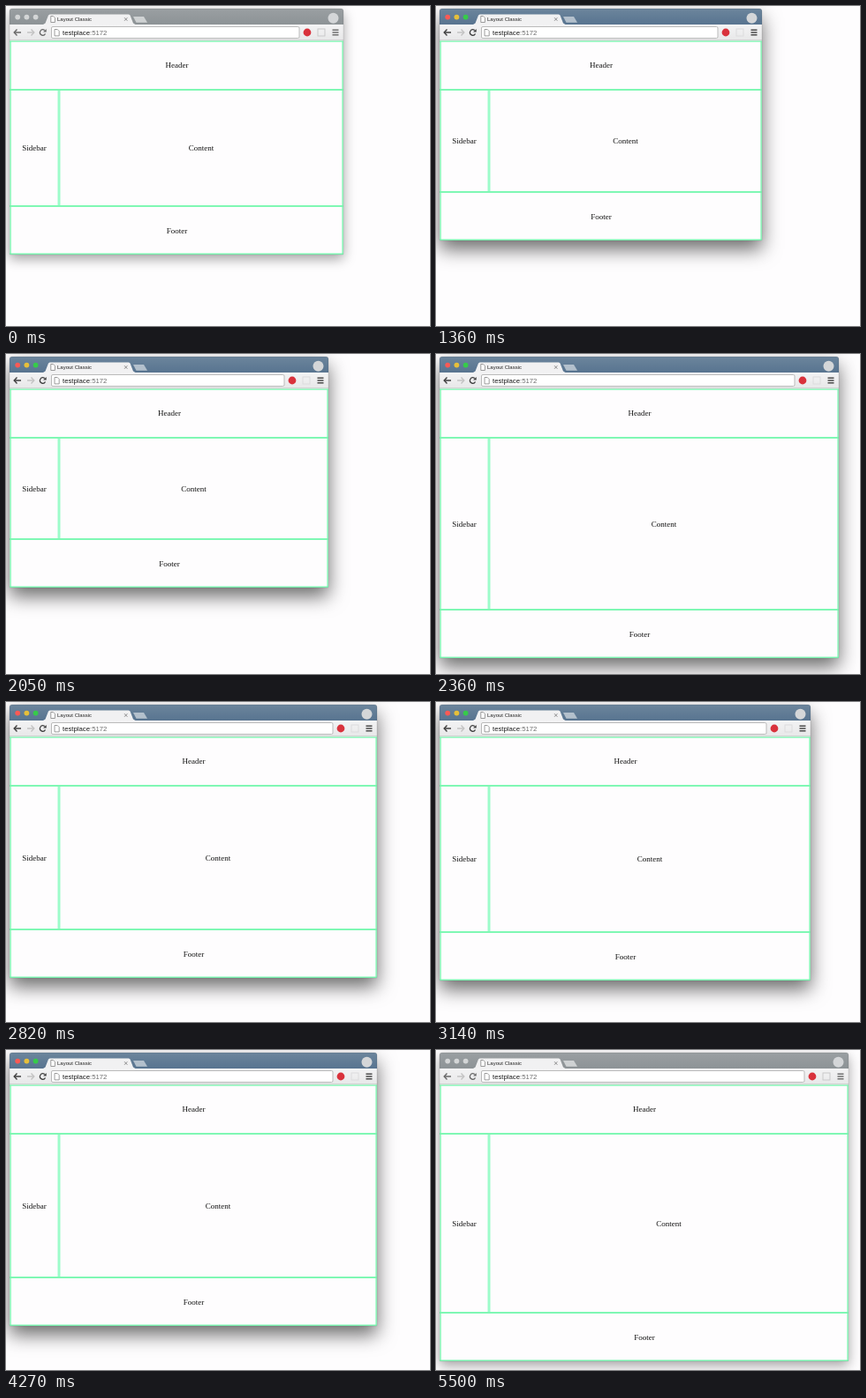
An HTML page with a canvas for the animation above (5550 ms loop, 480 by 363 pixels).

```html
<!DOCTYPE html>
<html lang="en">
<head>
<meta charset="utf-8">
<title>Resizing layout</title>
<style>
  html, body { margin: 0; width: 100%; height: 100%; overflow: hidden; background: #fefdfe; }
  canvas { display: block; width: 480px; height: 363px; }
</style>
</head>
<body>
<canvas id="stage"></canvas>
<script>
const LOOP = 5550;
const FOCUS = 300, BLUR = 5280;
const LEFT = 4, TOP = 3;
const PAPER = '#fefdfe';
const SANS = '"Liberation Sans", Arial, sans-serif';
const SERIF = '"Liberation Serif", Times, serif';

// time, right edge, bottom edge of the window
const KEYS = [
  [0, 382, 282], [1240, 382, 282], [1360, 369, 266], [1770, 316, 221],
  [1810, 315, 220], [2360, 456, 345], [2460, 465, 352], [2820, 420, 313],
  [2930, 412, 306], [3450, 452, 340], [3590, 457, 345], [4150, 420, 313],
  [4770, 420, 313], [5220, 467, 353], [LOOP, 467, 353]
];

const canvas = document.getElementById('stage');
const ctx = canvas.getContext('2d');
const dpr = window.devicePixelRatio || 1;
canvas.width = 480 * dpr;
canvas.height = 363 * dpr;
ctx.scale(dpr, dpr);

function slope(i, k) {
  const [a, b] = [KEYS[i], KEYS[i + 1]];
  return (b[k] - a[k]) / (b[0] - a[0]);
}

function tangent(i, k) {
  if (i === 0 || i === KEYS.length - 1) return 0;
  const p = slope(i - 1, k), q = slope(i, k);
  return p * q > 0 ? 2 * p * q / (p + q) : 0;
}

// monotone cubic through the keys
function edge(t, k) {
  let i = 0;
  while (i < KEYS.length - 2 && t >= KEYS[i + 1][0]) i++;
  const a = KEYS[i], b = KEYS[i + 1], d = b[0] - a[0];
  const u = (t - a[0]) / d, v = 1 - u;
  return Math.round(
    a[k] * (1 + 2 * u) * v * v + b[k] * u * u * (3 - 2 * u) +
    d * (tangent(i, k) * u * v * v - tangent(i + 1, k) * u * u * v));
}

function rect(x, y, w, h, fill) {
  ctx.fillStyle = fill;
  ctx.fillRect(x, y, w, h);
}

function disc(x, y, r, fill) {
  ctx.fillStyle = fill;
  ctx.beginPath();
  ctx.arc(x, y, r, 0, Math.PI * 2);
  ctx.fill();
}

function path(points, close) {
  ctx.beginPath();
  points.forEach(([x, y], i) => i ? ctx.lineTo(x, y) : ctx.moveTo(x, y));
  if (close) ctx.closePath();
}

function line(points, color, width) {
  path(points);
  ctx.strokeStyle = color;
  ctx.lineWidth = width;
  ctx.stroke();
}

function text(str, x, y, size, family, color, align = 'left') {
  ctx.font = size + 'px ' + family;
  ctx.textAlign = align;
  ctx.fillStyle = color;
  ctx.fillText(str, x, y);
  return ctx.measureText(str).width;
}

function shade(y0, y1, from, to) {
  const g = ctx.createLinearGradient(0, y0, 0, y1);
  g.addColorStop(0, from);
  g.addColorStop(1, to);
  return g;
}

function frameShape(right, bottom) {
  ctx.beginPath();
  ctx.roundRect(LEFT, TOP, right - LEFT, bottom - TOP, [3, 3, 1, 1]);
}

function pageIcon(x, y, w, h) {
  path([[x, y], [x + w - 2, y], [x + w, y + 2], [x + w, y + h], [x, y + h]], true);
  ctx.fillStyle = '#fff';
  ctx.fill();
  ctx.strokeStyle = '#858585';
  ctx.lineWidth = 0.8;
  ctx.stroke();
}

function arrow(x, y, dir, color) {
  line([[x - 4 * dir, y], [x + 3.5 * dir, y]], color, 1.4);
  line([[x + 0.5 * dir, y - 3.4], [x + 3.8 * dir, y], [x + 0.5 * dir, y + 3.4]], color, 1.4);
}

function titleBar(right, active) {
  rect(LEFT, TOP, right - LEFT, 18,
    active ? shade(3, 21, '#6c859c', '#587490') : shade(3, 21, '#9a9fa2', '#8d9396'));
  const lights = active ? ['#fb5a55', '#e6bf3a', '#36cb49'] : ['#d3d5d6', '#d3d5d6', '#d3d5d6'];
  lights.forEach((c, i) => disc(13.2 + i * 10.2, 12.6, 2.9, c));

  path([[42, 21], [44.5, 19.5], [48, 10.5], [49.5, 9.5], [139, 9.5], [140.5, 10.5], [144, 19.5], [146.5, 21]], true);
  ctx.fillStyle = '#f1f1f2';
  ctx.fill();
  pageIcon(50.8, 11.5, 4.6, 7);
  text('Layout Classic', 58, 17.2, 6, SANS, '#222');
  line([[134, 13.2], [137.4, 16.8]], '#777', 0.8);
  line([[137.4, 13.2], [134, 16.8]], '#777', 0.8);

  path([[144, 12], [156, 12], [160, 18.8], [147.5, 18.8]], true);
  ctx.fillStyle = active ? '#b3c0cc' : '#cfd2d3';
  ctx.fill();
  disc(right - 11.5, 13.8, 6, '#d4d6d8');
}

function toolbar(right, active) {
  const ink = active ? '#3f3f3f' : '#686868';
  rect(LEFT, 21, right - LEFT, 18, shade(21, 39, '#f3f3f4', '#e8e8e9'));
  rect(LEFT, 38.5, right - LEFT, 1, '#b9bdbb');
  arrow(13, 30, -1, ink);
  arrow(28, 30, 1, '#c3c3c3');

  ctx.strokeStyle = ink;
  ctx.lineWidth = 1.3;
  ctx.beginPath();
  ctx.arc(41.7, 30, 3.2, 0.5, 5.4);
  ctx.stroke();
  path([[45.7, 26], [45.7, 29.6], [42.1, 29.6]], true);
  ctx.fillStyle = ink;
  ctx.fill();

  ctx.beginPath();
  ctx.roundRect(51.5, 23.5, right - 50 - 51.5, 13, 1.5);
  ctx.fillStyle = '#fff';
  ctx.fill();
  ctx.strokeStyle = '#bababa';
  ctx.lineWidth = 1;
  ctx.stroke();
  pageIcon(55, 26.5, 5.2, 7.4);
  const w = text('testplace', 64, 32.8, 7.75, SANS, '#1c1c1c');
  text(':5172', 64 + w, 32.8, 7.75, SANS, '#6c6c6c');

  disc(right - 41, 30, 4.4, '#d9323c');
  ctx.strokeStyle = active ? '#dcdcdd' : '#c9c9ca';
  ctx.lineWidth = 1;
  ctx.strokeRect(right - 29, 26, 8, 8);
  for (const y of [26.5, 29.3, 32.1]) rect(right - 12.5, y, 7, 1.4, ink);
}

function layout(right, bottom) {
  const green = '#7ff8b4', pale = '#9dfcca';
  const foot = bottom - 55;
  const mid = (LEFT + right) / 2;
  rect(LEFT, 39.5, right - LEFT, bottom - 39.5, PAPER);

  rect(58.5, 96, 3, foot - 96, pale);
  rect(LEFT, 39.5, right - LEFT, 1.3, green);
  rect(LEFT, 94, right - LEFT, 2, green);
  rect(LEFT, foot - 1, right - LEFT, 2, green);
  rect(LEFT, bottom - 1.5, right - LEFT, 1.5, green);
  rect(LEFT + 0.4, 40, 1.4, bottom - 40, green);
  rect(right - 1.6, 40, 1.4, bottom - 40, green);

  const label = (str, x, y) => text(str, x, y + 3, 9, SERIF, '#111', 'center');
  const row = (96 + foot) / 2 - 0.5;
  label('Header', mid + 0.5, 67);
  label('Sidebar', 32, row);
  label('Content', (60 + right) / 2, row);
  label('Footer', mid + 0.5, bottom - 27);
}

function draw(t) {
  const right = edge(t, 1), bottom = edge(t, 2);
  const active = t >= FOCUS && t < BLUR;
  rect(0, 0, 480, 363, PAPER);

  ctx.save();
  ctx.shadowColor = active ? 'rgba(0,0,0,.58)' : 'rgba(0,0,0,.36)';
  ctx.shadowBlur = (active ? 21 : 14) * dpr;
  ctx.shadowOffsetY = (active ? 10 : 5) * dpr;
  frameShape(right, bottom);
  ctx.fillStyle = PAPER;
  ctx.fill();
  ctx.restore();

  ctx.save();
  frameShape(right, bottom);
  ctx.clip();
  titleBar(right, active);
  toolbar(right, active);
  layout(right, bottom);
  ctx.restore();

  frameShape(right, bottom);
  ctx.strokeStyle = 'rgba(0,0,0,.16)';
  ctx.lineWidth = 0.6;
  ctx.stroke();
}

const start = performance.now();
function tick() {
  draw((performance.now() - start) % LOOP);
  requestAnimationFrame(tick);
}
tick();
</script>
</body>
</html>
```
